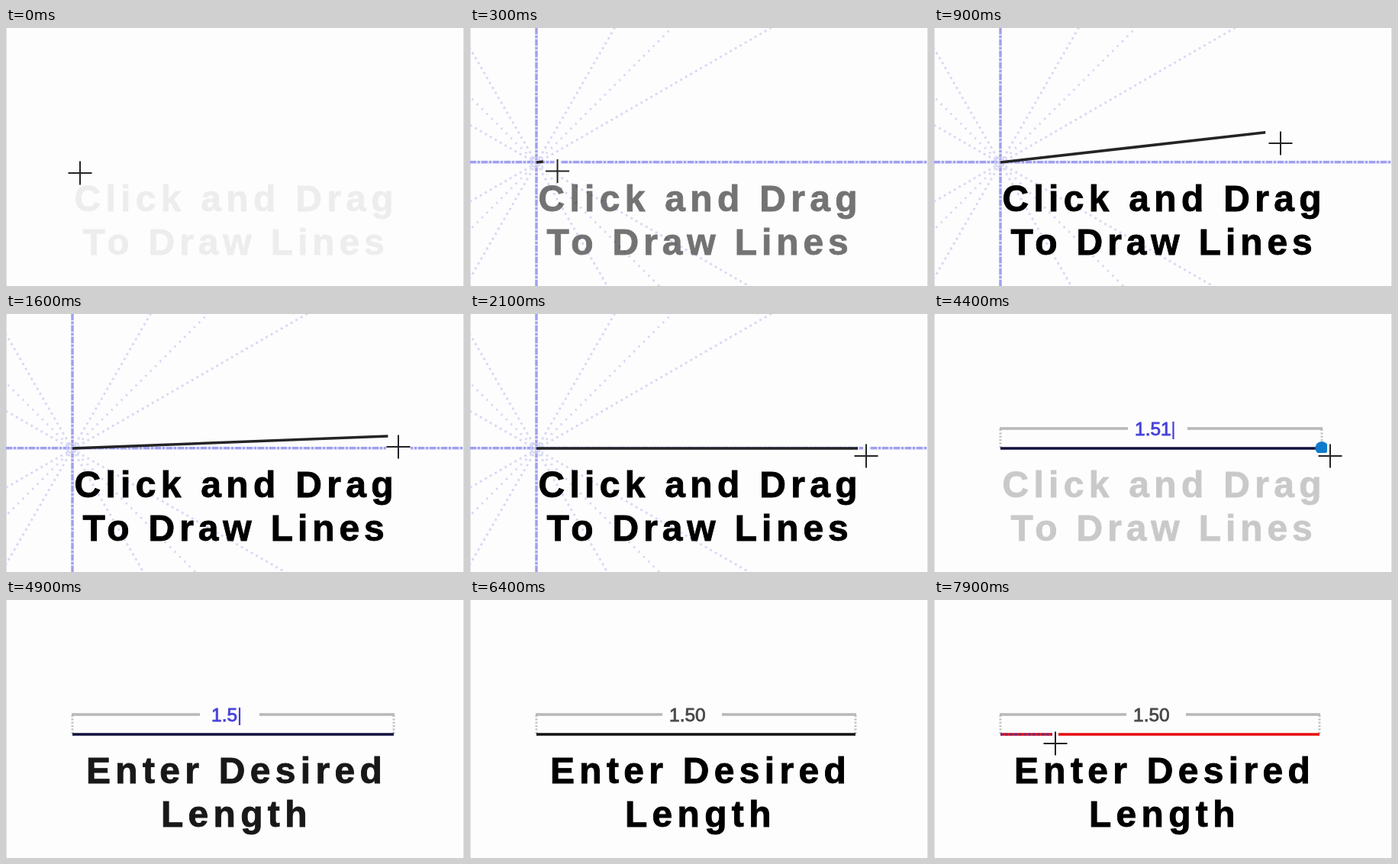
An HTML page for the animation above (8 s loop, 600 px wide and 338 px high).

```html
<!DOCTYPE html>
<html lang="en">
<head>
<meta charset="utf-8">
<title>Drawing lines</title>
<style>
  html, body { margin: 0; width: 100%; height: 100%; overflow: hidden; background: #fdfdfe; }
  svg { display: block; width: 100vw; height: 100vh; }
  text { font-family: "Liberation Sans", Arial, sans-serif; white-space: pre; }
  .title { font-size: 48px; font-weight: bold; letter-spacing: 6.3px; stroke: #000; stroke-width: .9; }
  .tight { letter-spacing: 5.9px; }
  .value { font-size: 24.5px; stroke-width: .8; }
</style>
</head>
<body>
<svg viewBox="0 0 600 338">
  <rect width="600" height="338" fill="#fdfdfe"/>
  <path d="M.5 0V338M599.5 0V338" stroke="#dcdcde"/>

  <g id="guides" fill="none">
    <g id="rays" stroke="#d9d9f4" stroke-width="3"></g>
    <path d="M0 175.7H600M87 0V338" stroke="#dedef9" stroke-width="4"/>
    <path d="M0 175.7H600M87 0V338" stroke="#a0a0ee" stroke-width="3.2" stroke-dasharray="8 2 3 2"/>
    <circle cx="86" cy="176" r="6" stroke="#d0d0f4" stroke-width="2"/>
  </g>

  <g id="dim" fill="none">
    <path id="rails" stroke="#b8b8b8" stroke-width="3.4"/>
    <path id="ticks" stroke="#bdbdbd" stroke-width="3" stroke-dasharray="2 2.4"/>
    <text id="value" class="value" y="159"></text>
    <path id="caret" stroke="#4540d8" stroke-width="2.2"/>
  </g>

  <path id="line" fill="none" stroke-width="3.6"/>
  <path id="trace" fill="none" stroke="#7c2a70" stroke-width="3" stroke-dasharray="4 2"/>
  <circle id="dot" cx="508" cy="175.5" r="8.6" fill="#0f7bca"/>

  <g id="draw" class="title">
    <text x="89.5" y="240">Click and Drag</text>
    <text class="tight" x="100.5" y="297">To Draw Lines</text>
  </g>
  <g id="enter" class="title">
    <text x="105" y="240">Enter Desired</text>
    <text x="203" y="297">Length</text>
  </g>

  <g id="cross" fill="none">
    <path d="M-16 0H16M0 -16V16" stroke="#fdfdfe" stroke-width="8"/>
    <path d="M-15.5 0H15.5M0 -15.5V15.5" stroke="#242424" stroke-width="2"/>
  </g>
</svg>
<script>
const LOOP = 8000, STEP = 100;
const START = 200, SNAP = 1900, RELEASE = 2400, EDIT = 4900, COMMIT = 6400, HOVER = 7400;

const el = {};
document.querySelectorAll("[id]").forEach(n => el[n.id] = n);
const set = (n, attrs) => { for (const k in attrs) n.setAttribute(k, attrs[k]); };
const show = (n, on) => set(n, { display: on ? "inline" : "none" });
const clamp = v => Math.max(0, Math.min(1, v));

// Dotted rays at 30, 45 and 60 degrees in each quadrant; the diagonals are sparser
el.rays.innerHTML = [30, 45, 60, 120, 135, 150].map(deg => {
  const a = deg * Math.PI / 180, x = 700 * Math.cos(a), y = 700 * Math.sin(a);
  const dash = deg % 30 ? "2.5 6.5" : "3 4.5";
  return [1, -1].map(s =>
    `<path d="M87 177.2l${s * x} ${-s * y}" stroke-dasharray="${dash}"/>`).join("");
}).join("");

// Pointer path: time, x, y, speed x, speed y (px per ms)
const path = [
  [START, 97, 190, 0, 0],
  [900, 454, 151, .18, .03],
  [1600, 514, 174, 0, .01],
  [1800, 515, 175, .01, .02],
  [2050, 519, 186, 0, 0]
];

function hermite(a, b, va, vb, d, u) {
  const u2 = u * u, u3 = u2 * u;
  return a * (2 * u3 - 3 * u2 + 1) + b * (3 * u2 - 2 * u3)
    + va * d * (u3 - 2 * u2 + u) + vb * d * (u3 - u2);
}

function pointer(t) {
  let i = 0;
  while (i < path.length - 2 && t > path[i + 1][0]) i++;
  const p = path[i], q = path[i + 1], d = q[0] - p[0], u = clamp((t - p[0]) / d);
  return [1, 2].map(k => hermite(p[k], q[k], p[k + 2], q[k + 2], d, u));
}

function tip(t) {
  if (t >= COMMIT) return [505, 176];
  if (t >= SNAP) return [508, 176];
  const [x, y] = pointer(t - 28);
  const k = clamp((t - START) / 600);
  return [x - 10 - 3.5 * k, y - 13.6];
}

function dimension(t) {
  const done = t >= COMMIT, end = done ? 505 : 508, gap = done ? 252 : 254;
  const color = done ? "#484848" : "#4540d8";
  set(el.rails, { d: `M86 150H${gap}M${gap + 78} 150H${end + 1}` });
  set(el.ticks, { d: `M87 151V175M${end} 151V175` });
  el.value.textContent = done ? "1.50" : t >= EDIT ? "1.5" : "1.51";
  set(el.value, { x: done ? 261 : t >= EDIT ? 269 : 263, fill: color, stroke: color });
  set(el.caret, { d: `M${t >= EDIT ? 306 : 313.5} 141V164` });
  show(el.caret, !done);
}

function render(t) {
  const drawing = t >= START && t < RELEASE, hover = t >= HOVER;
  show(el.guides, drawing);
  show(el.dim, t >= RELEASE);
  if (t >= RELEASE) dimension(t);

  const [x, y] = tip(t);
  show(el.line, t >= START);
  set(el.line, {
    d: `M87 176L${x} ${y}`,
    stroke: hover ? "#e60c10" : drawing ? "#242426" : t < COMMIT ? "#10103c" : "#111"
  });
  show(el.dot, t >= RELEASE && t < EDIT);

  const u = (t - HOVER) / 500;
  const [cx, cy] = hover ? [102 + 57 * u * (.6 + .4 * u), 188] : pointer(t);
  show(el.cross, t < EDIT || hover);
  set(el.cross, { transform: `translate(${cx} ${cy})` });
  show(el.trace, hover);
  set(el.trace, { d: `M87 176H${cx - 3}` });

  set(el.draw, { opacity: t < 4000 ? clamp(.06 + t * .0016) : clamp(.84 - (t - 4000) * .0016) });
  set(el.enter, { opacity: clamp((t - 4450) / 500) });
}

const t0 = performance.now();
function tick() {
  const t = (performance.now() - t0) % LOOP;
  render(Math.floor(t / STEP) * STEP);
  requestAnimationFrame(tick);
}
tick();
</script>
</body>
</html>
```
